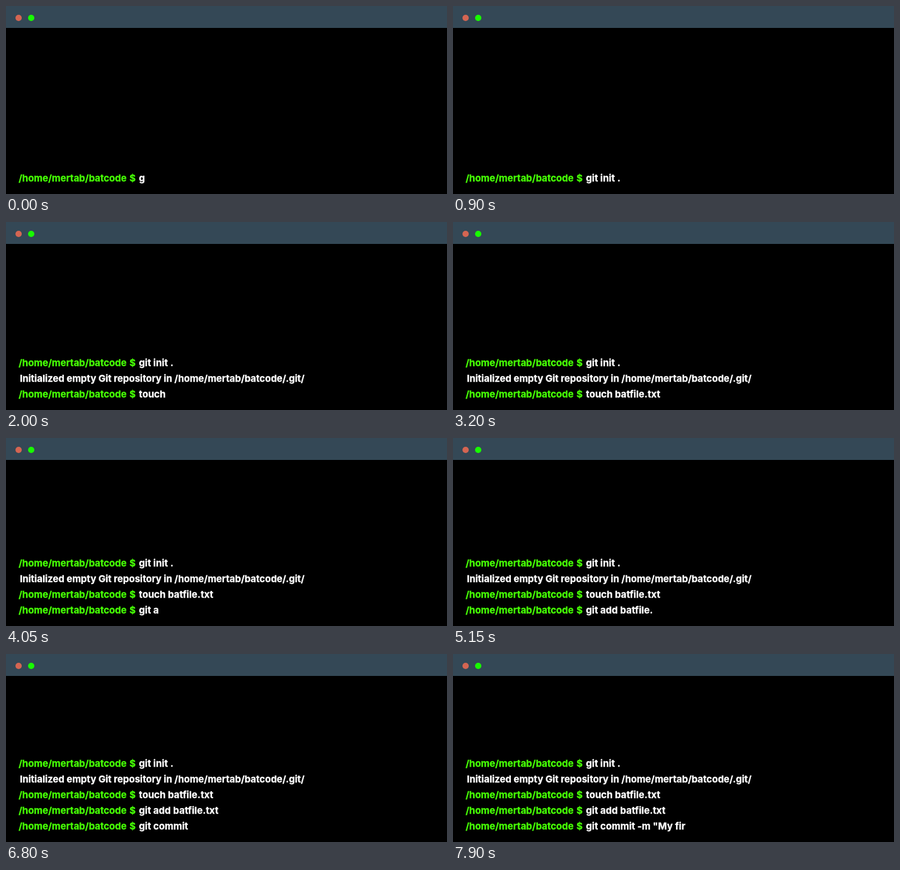
An HTML page for the animation above (8000 ms loop, 700 by 300 pixels).

```html
<!DOCTYPE html>
<html lang="en">
<head>
<meta charset="utf-8">
<title>Terminal</title>
<style>
  html, body { margin: 0; width: 100%; height: 100%; overflow: hidden; background: #000; }
  .term {
    position: relative; width: 700px; height: 300px; overflow: hidden;
    background: #000; color: #fff;
    font: 700 15px/25px Inter, "Liberation Sans", sans-serif;
    -webkit-text-stroke: .3px currentColor;
  }
  .bar { position: absolute; left: 0; top: 0; width: 700px; height: 35px; background: #344856; }
  .dot { position: absolute; top: 14px; width: 10px; height: 10px; border-radius: 50%; }
  .red { left: 15px; background: #d46552; }
  .green { left: 35px; background: #18fb00; }
  .row { position: absolute; left: 0; width: 700px; height: 25px; white-space: pre; }
  .row span { position: absolute; top: 0; }
  .path { left: 20px; color: #46ff05; }
  .sign { left: 196px; color: #46ff05; }
  .cmd { left: 211px; letter-spacing: .06px; }
  .out { left: 22px; }
</style>
</head>
<body>
<div class="term">
  <div class="bar"><i class="dot red"></i><i class="dot green"></i></div>
  <div id="rows"></div>
</div>
<script>
  const LOOP = 8000, KEY = 100, LINE = 25, LAST_TOP = 262;
  const PATH = '/home/mertab/batcode';

  // slot: the screen scrolls to make room; start: the line begins to show
  const lines = [
    { slot: 0, start: 0, cmd: 'git init .' },
    { slot: 1300, start: 1500, out: `Initialized empty Git repository in ${PATH}/.git/` },
    { slot: 1600, start: 1600, cmd: 'touch batfile.txt' },
    { slot: 3450, start: 3650, cmd: 'git add batfile.txt' },
    { slot: 5700, start: 5900, cmd: 'git commit -m "My fir' }
  ];

  function addSpan(row, cls, text) {
    const span = document.createElement('span');
    span.className = cls;
    span.textContent = text;
    row.appendChild(span);
    return span;
  }

  for (const line of lines) {
    line.row = document.createElement('div');
    line.row.className = 'row';
    if (line.out) {
      addSpan(line.row, 'out', line.out);
    } else {
      addSpan(line.row, 'path', PATH);
      addSpan(line.row, 'sign', '$');
      line.typed = addSpan(line.row, 'cmd', '');
    }
    document.getElementById('rows').appendChild(line.row);
  }

  function draw(t) {
    const used = lines.filter(line => t >= line.slot).length;
    lines.forEach((line, i) => {
      line.row.style.top = LAST_TOP - (used - 1 - i) * LINE + 'px';
      line.row.style.visibility = t >= line.start ? 'visible' : 'hidden';
      if (line.typed) {
        const count = Math.max(0, Math.floor((t - line.start) / KEY) + 1);
        const text = line.cmd.slice(0, count);
        if (line.typed.textContent !== text) line.typed.textContent = text;
      }
    });
  }

  const begin = performance.now();
  function tick() {
    draw((performance.now() - begin) % LOOP);
    requestAnimationFrame(tick);
  }
  tick();
</script>
</body>
</html>
```
